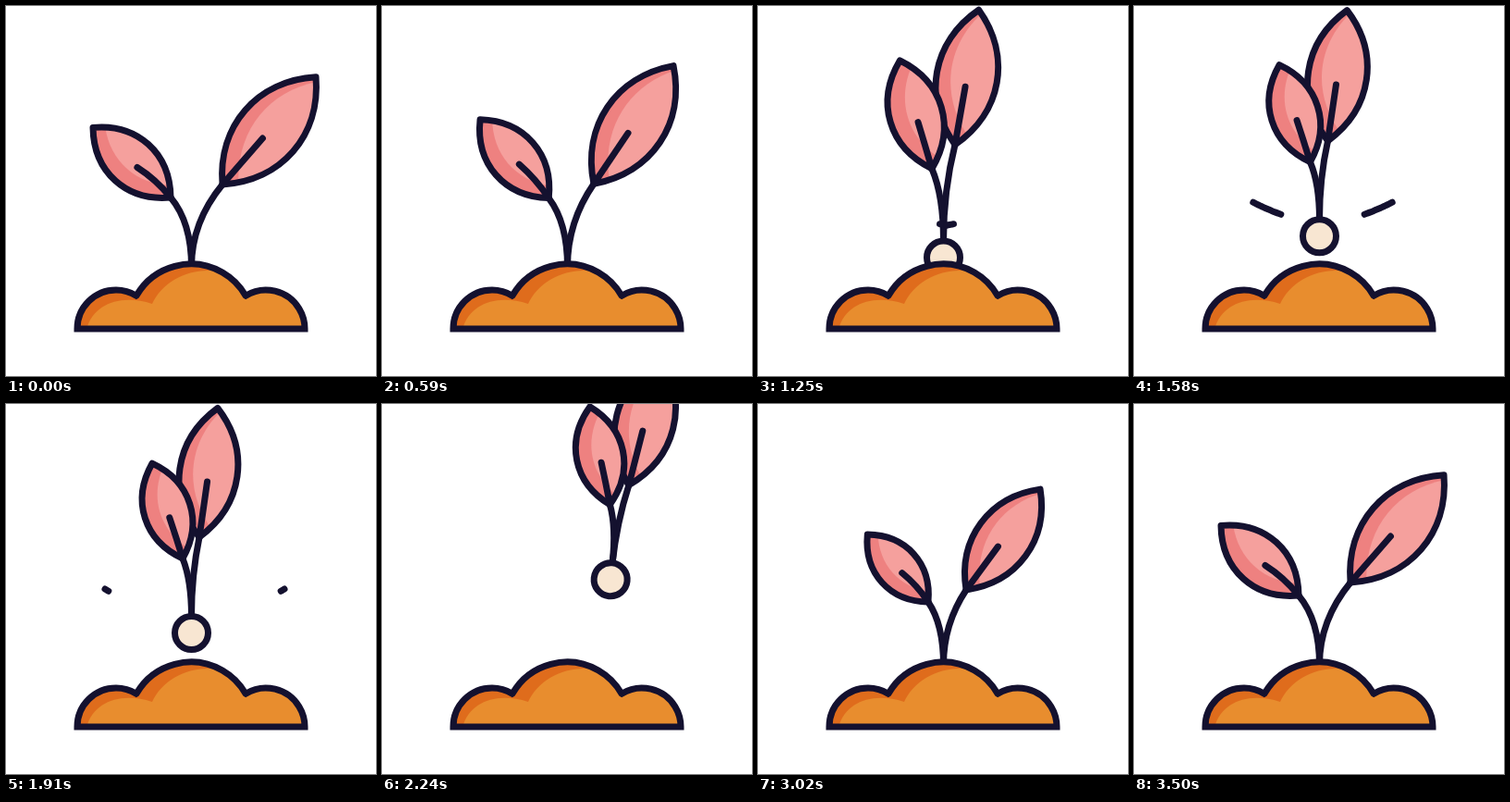
An HTML page with a canvas that plays this animation: 400x400 px, repeating every 3.53 s.

```html
<!DOCTYPE html>
<html lang="en">
<head>
<meta charset="utf-8">
<title>Sprout</title>
<style>
  html, body { margin: 0; width: 100%; height: 100%; overflow: hidden; background: #fff; }
  canvas { display: block; width: 100vmin; height: 100vmin; }
</style>
</head>
<body>
<canvas id="stage" width="400" height="400"></canvas>
<script>
const ctx = document.getElementById('stage').getContext('2d');
const LOOP = 3530;
const INK = '#14112f', PINK = '#f5a09d', ROSE = '#ee8180';
const EARTH = '#e88d2e', CLAY = '#df6c1c', SEED = '#f8e6d2';

// time, seed y, then per leaf (right, left): base x, base y, angle, length
const REST = [300, 234, 193, 41, 154, 178, 207, -48, 113];
const PLUCK = [
  [500, ...REST],
  [830, 300, 207, 187, 3.3, 154, 190, 210, -11.4, 111],
  [1040, 293, 208, 180, 6, 154, 189, 203, -13, 114],
  [1250, 272, 213, 150, 10, 148, 188, 176, -16.5, 122],
  [1450, 250, 210, 147, 8.6, 144, 190, 170, -17.5, 112],
  [1910, 247.5, 209, 144, 8.1, 141, 191, 167, -17.8, 108]
];
const GROW = [
  [2330, 300, 200, 292, 4, 4, 200, 292, -4, 3],
  [2510, 300, 205, 248, 13, 53, 197, 250, -13, 36],
  [3020, 300, 225, 201, 36.3, 135, 184, 214, -42, 98],
  [3300, ...REST]
];
const EXIT_START = 2090, EXIT_END = 2430;

const clamp = x => Math.min(1, Math.max(0, x));
const progress = (t, from, to) => clamp((t - from) / (to - from));

// Smooth interpolation that never overshoots a key.
function pose(keys, t) {
  const last = keys.length - 1;
  if (t <= keys[0][0]) return keys[0].slice(1);
  if (t >= keys[last][0]) return keys[last].slice(1);
  const i = keys.findIndex(k => k[0] > t) - 1;
  const slope = (n, c) => (keys[n + 1][c] - keys[n][c]) / (keys[n + 1][0] - keys[n][0]);
  const tangent = (n, c) => {
    if (n === 0 || n === last) return 0;
    const a = slope(n - 1, c), b = slope(n, c);
    return a * b > 0 ? 2 * a * b / (a + b) : 0;
  };
  const span = keys[i + 1][0] - keys[i][0];
  const u = (t - keys[i][0]) / span;
  return keys[i].slice(1).map((from, n) => {
    const c = n + 1, to = keys[i + 1][c];
    const ease = u * u * (3 - 2 * u);
    const bend = u * (1 - u) * span *
      ((1 - u) * tangent(i, c) - u * tangent(i + 1, c));
    return from + (to - from) * ease + bend;
  });
}

function strokePath(draw) {
  ctx.beginPath();
  draw();
  ctx.stroke();
}

function leafPath(length, half, dx = 0, dy = 0) {
  const c = half / 0.75, k = length * 0.29;
  ctx.beginPath();
  ctx.moveTo(dx, dy);
  ctx.bezierCurveTo(dx - c, dy - k, dx - c, dy - length + k, dx, dy - length);
  ctx.bezierCurveTo(dx + c, dy - length + k, dx + c, dy - k, dx, dy);
}

function leaf(x, y, angle, length, shape) {
  const half = length * shape.width;
  ctx.save();
  ctx.translate(x, y);
  ctx.rotate(angle * Math.PI / 180);
  ctx.save();
  leafPath(length, half);
  ctx.fillStyle = ROSE;
  ctx.fill();
  ctx.clip();
  leafPath(length, half, length * shape.lightX, length * shape.lightY);
  ctx.fillStyle = PINK;
  ctx.fill();
  ctx.restore();
  leafPath(length, half);
  ctx.stroke();
  const bow = shape.bow * Math.max(0, Math.abs(angle) - 15);
  strokePath(() => {
    ctx.moveTo(0, 0);
    ctx.quadraticCurveTo(bow, -length * 0.22, 0, -length * 0.43);
  });
  ctx.restore();
}

function stem(x, y, bottom, turn) {
  strokePath(() => {
    ctx.moveTo(200.5, bottom);
    ctx.quadraticCurveTo(200.5, y + (Math.min(bottom, 278) - y) * turn, x, y);
  });
}

const RIGHT = { width: 0.222, lightX: 0.1, lightY: -0.06, bow: 0 };
const LEFT = { width: 0.235, lightX: 0.16, lightY: 0, bow: 0.12 };

function plant([seedY, rx, ry, ra, rl, lx, ly, la, ll]) {
  const bottom = seedY - 18;
  stem(rx, ry, bottom, 0.48);
  leaf(rx, ry, ra, rl, RIGHT);
  stem(lx, ly, bottom, 0.38);
  leaf(lx, ly, la, ll, LEFT);
  ctx.beginPath();
  ctx.arc(200.5, seedY, 18, 0, Math.PI * 2);
  ctx.fillStyle = SEED;
  ctx.fill();
  ctx.stroke();
}

function soilPath() {
  const big = Math.atan2(34, 59), small = Math.atan2(36, 22);
  ctx.beginPath();
  ctx.moveTo(77, 349);
  ctx.arc(119, 349, 42, Math.PI, -small);
  ctx.arc(200, 347, 68, -Math.PI + big, -big);
  ctx.arc(281, 349, 42, -Math.PI + small, 0);
  ctx.closePath();
}

function soil() {
  ctx.save();
  soilPath();
  ctx.fillStyle = CLAY;
  ctx.fill();
  ctx.clip();
  ctx.beginPath();
  ctx.moveTo(87, 350);
  ctx.bezierCurveTo(94, 322, 124, 311, 158, 322);
  ctx.bezierCurveTo(169, 299, 194, 284, 228, 286);
  ctx.lineTo(270, 270);
  ctx.lineTo(330, 300);
  ctx.lineTo(330, 350);
  ctx.fillStyle = EARTH;
  ctx.fill();
  ctx.restore();
  ctx.lineJoin = 'miter';
  soilPath();
  ctx.stroke();
  ctx.lineJoin = 'round';
}

function burst(t) {
  if (t < 1220 || t > 1940) return;
  const p = progress(t, 1220, 1940);
  const head = 1 - Math.pow(1 - clamp(p * 1.35), 1.3);
  const tail = Math.pow(clamp((p - 0.2) / 0.8), 0.8);
  for (const side of [-1, 1]) {
    strokePath(() => {
      for (let i = 0; i <= 16; i++) {
        const u = tail + (head - tail) * i / 16;
        const x = 204 + side * (100 * u * (1 - u) + 97 * u * u);
        const y = 237 - 16 * u * (1 - u) - 37 * u * u;
        ctx.lineTo(x, y);
      }
    });
  }
}

function render(t) {
  ctx.fillStyle = '#fff';
  ctx.fillRect(0, 0, 400, 400);
  ctx.strokeStyle = INK;
  ctx.lineWidth = 7;
  ctx.lineCap = ctx.lineJoin = 'round';

  if (t >= GROW[0][0]) plant(pose(GROW, t));
  if (t < EXIT_END) {
    const away = Math.pow(progress(t, EXIT_START, EXIT_END), 2);
    ctx.save();
    ctx.translate(200 + 290 * away, 150 - 290 * away);
    ctx.rotate(0.55 * away);
    ctx.translate(-200, -150);
    plant(pose(PLUCK, t));
    ctx.restore();
  }
  burst(t);
  soil();
}

const start = performance.now();
function tick() {
  render((performance.now() - start) % LOOP);
  requestAnimationFrame(tick);
}
tick();
</script>
</body>
</html>
```
